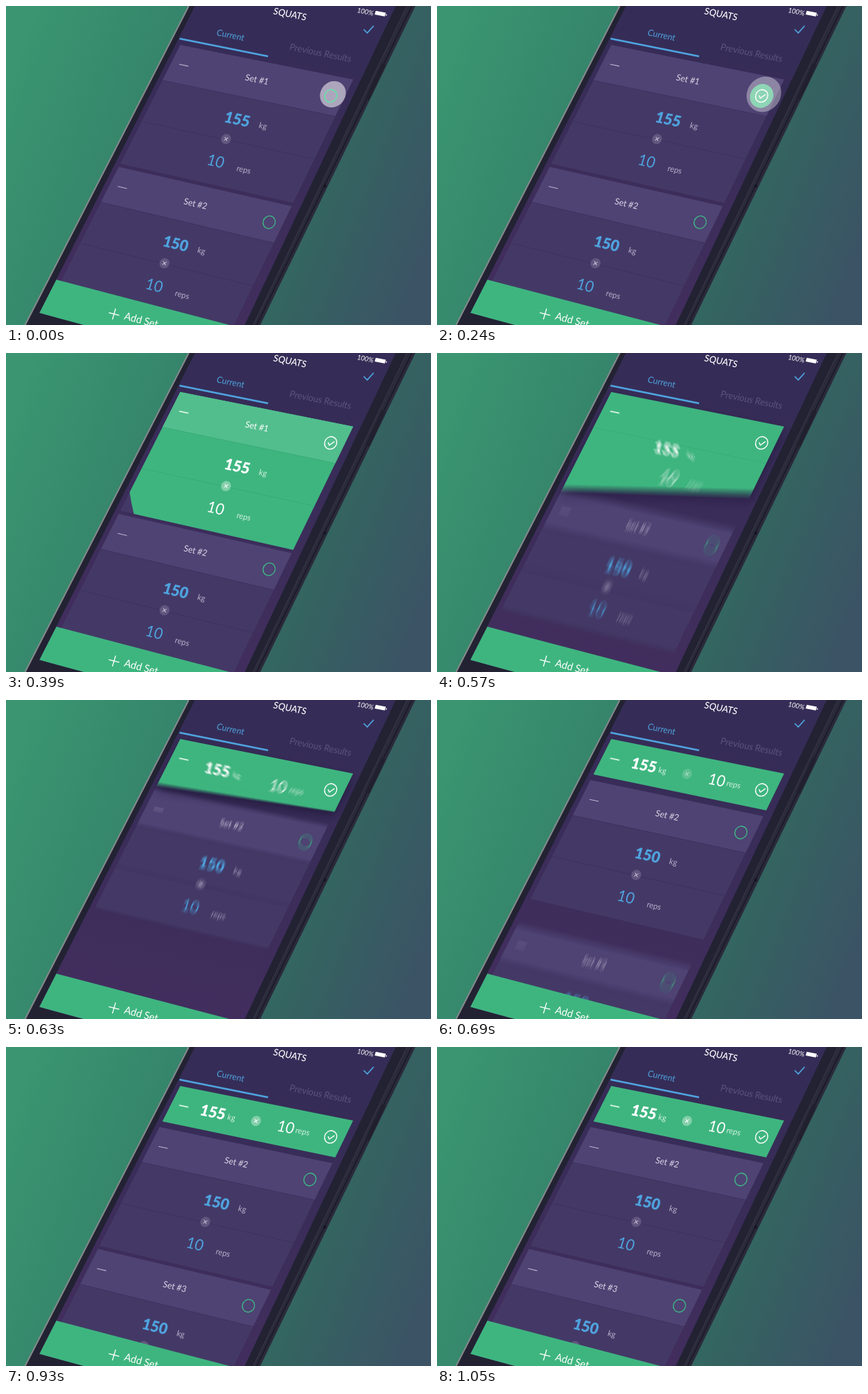
Write an HTML page with a canvas that moves like this. It is 600 px wide and 450 px high and loops after 1080 ms.

```html
<!DOCTYPE html>
<html lang="en">
<meta charset="utf-8">
<title>Workout sets</title>
<style>
html, body { margin: 0; overflow: hidden; }
canvas { display: block; }
</style>
<canvas id="stage" width="600" height="450"></canvas>
<script>
const LOOP = 1080, STEP = 30, CARD_W = 249, CARD_H = 188, HEAD_H = 56, PITCH = 193;
const BLUE = '#4fa3df', GREEN = '#3eb57f', WHITE = '#fff';
const PURPLE_LOOK = { body: '#443966', head: '#4e4373', kg: BLUE, reps: BLUE, text: '#dcd7e8',
  unit: '#b9b1cd', ring: '#3fb884', dot: '#62567f', cross: '#cbc4da', dash: 1.2, line: '#3d325f' };
const GREEN_LOOK = { body: GREEN, head: '#52be8d', kg: WHITE, reps: WHITE, text: WHITE,
  unit: '#d5f2e3', ring: WHITE, dot: '#83cfaa', cross: WHITE, dash: 1.8, line: '#38aa76' };

const stage = document.getElementById('stage').getContext('2d');
const layer = document.createElement('canvas');
layer.width = 600;
layer.height = 450;
const ctx = layer.getContext('2d');

const clamp = v => Math.max(0, Math.min(1, v));
const ramp = (t, a, b) => clamp((t - a) / (b - a));
const mix = (a, b, k) => a + (b - a) * k;
const ease = (t, a, b) => {
  const k = ramp(t, a, b);
  return k < .5 ? 4 * k ** 3 : 1 - 4 * (1 - k) ** 3;
};

// The list lies on a tilted plane: x runs across it, y down it.
const tilt = y => .2 + .000143 * y;
const point = (x, y) => [246 + .98 * x - .45 * y, 55 + .891 * y + .98 * x * tilt(y)];

function poly(c, points, fill) {
  c.beginPath();
  points.forEach(p => c.lineTo(...p));
  c.closePath();
  c.fillStyle = fill;
  c.fill();
}

function line(c, points, color, width) {
  c.beginPath();
  points.forEach(p => c.lineTo(...p));
  c.strokeStyle = color;
  c.lineWidth = width;
  c.stroke();
}

// Runs draw() with the origin at a stage position and tilted axes.
function at([px, py], slope, draw) {
  ctx.save();
  ctx.transform(.92, .92 * slope, -.28, .96, px, py);
  draw();
  ctx.restore();
}

const onPlane = (x, y, draw) => at(point(x, y), tilt(y), draw);

function label(str, size, weight, color) {
  ctx.font = `${weight} ${size}px Lato, "Open Sans", sans-serif`;
  ctx.textAlign = 'center';
  ctx.fillStyle = color;
  ctx.fillText(str, 0, size * (/^[a-z]/.test(str) ? .2 : .35));
}

function disc(r, color) {
  ctx.beginPath();
  ctx.arc(0, 0, r, 0, 7);
  ctx.fillStyle = color;
  ctx.fill();
}

function ring(color, ticked) {
  ctx.beginPath();
  ctx.arc(0, 0, 9, 0, 7);
  ctx.strokeStyle = color;
  ctx.lineWidth = 1.4;
  ctx.stroke();
  if (ticked) line(ctx, [[-4, 0], [-1, 3.5], [5, -3]], color, 1.4);
}

function card(y, name, kg, look, t = 0) {
  const left = mix(CARD_H, HEAD_H, ease(t, 485, 695));
  const right = mix(CARD_H, HEAD_H, ease(t, 453, 663));
  const move = ease(t, 482, 695), mx = move ** 1.25, my = move ** .75;
  const intro = 1 - ramp(t, 450, 540);
  const item = (x0, y0, x1, y1, draw) => onPlane(mix(x0, x1, mx), y + mix(y0, y1, my), draw);

  ctx.save();
  if (t > 450 && move < .98) {
    ctx.shadowColor = 'rgba(25,18,50,.6)';
    ctx.shadowBlur = 14;
    ctx.shadowOffsetY = 6;
  }
  poly(ctx, [point(0, y), point(CARD_W, y), point(CARD_W, y + right), point(0, y + left)], look.body);
  ctx.restore();

  ctx.globalAlpha = intro;
  poly(ctx, [point(0, y), point(CARD_W, y), point(CARD_W, y + HEAD_H), point(0, y + HEAD_H)], look.head);
  line(ctx, [point(0, y + 121), point(CARD_W, y + 121)], look.line, 1);
  onPlane(123, y + 27, () => label(name, 12.5, 400, look.text));
  ctx.globalAlpha = 1 - move;
  line(ctx, [point(0, y + HEAD_H), point(CARD_W, y + HEAD_H)], look.line, 1);
  ctx.globalAlpha = 1;

  onPlane(18, y + 28, () => line(ctx, [[-7, 0], [7, 0]], look.unit, look.dash));
  onPlane(230, y + 29, () => ring(look.ring, look === GREEN_LOOK));
  item(123, 89, 60, 28, () => label(kg, 22, 900, look.kg));
  item(161, 92, 88, 32, () => label('kg', 11.5, 400, look.unit));
  item(122, 154, 165, 28, () => label('10', 22, 400, look.reps));
  item(164, 159, 190, 31, () => label('reps', 11.5, 400, look.unit));
  ctx.globalAlpha = Math.max(1 - ramp(t, 480, 560), ramp(t, 660, 720));
  item(121, 120, 122, 28, () => {
    disc(7.3, look.dot);
    line(ctx, [[-2.5, -2.5], [2.5, 2.5]], look.cross, 1);
    line(ctx, [[2.5, -2.5], [-2.5, 2.5]], look.cross, 1);
  });
  ctx.globalAlpha = 1;
}

function firstCard(t) {
  const reveal = 298 * ramp(t, 180, 390) ** 2.28 + 60 * ramp(t, 390, 420);
  if (t < 420) card(0, 'Set #1', '155', PURPLE_LOOK);
  if (reveal > 0) {
    ctx.save();
    if (t < 420) {
      onPlane(230, 29, () => {
        ctx.beginPath();
        ctx.arc(0, 0, reveal, 0, 7);
      });
      ctx.clip();
    }
    card(0, 'Set #1', '155', GREEN_LOOK, t);
    ctx.restore();
  }
  const touch = t < 240 ? mix(.53, .35, ramp(t, 120, 240)) : .35 * (1 - ramp(t, 240, 360));
  if (touch > 0) {
    at([461.5, 124.5], .2, () => disc(mix(19, 25.5, ramp(t, 120, 240)), `rgba(255,255,255,${touch})`));
    if (reveal < 9) onPlane(230, 29, () => ring('#5fdca2', false));
  }
}

function chrome() {
  poly(ctx, [[230, 0], [600, 0], [600, 130], [490, 97], [229, 44]], '#352d57');
  at([401, 11.5], .2, () => label('SQUATS', 13.2, 500, WHITE));
  at([507.5, 8], .2, () => label('100%', 9.8, 400, WHITE));
  at([528.5, 11], .2, () => {
    ctx.fillStyle = WHITE;
    ctx.fillRect(-8, -3, 15.5, 5.5);
    ctx.fillRect(8.3, -1, 1.5, 2);
  });
  line(ctx, [[505, 33], [510, 38], [519, 28]], BLUE, 1.7);
  at([317, 41], .2, () => label('Current', 12.5, 400, BLUE));
  at([444, 66], .2, () => label('Previous Results', 13.2, 400, '#5d5383'));
  line(ctx, [[245, 46], [370, 71]], BLUE, 2.6);
}

function footer() {
  poly(ctx, [[71, 386], [350, 459], [350, 520], [47, 433]], GREEN);
  at([152.5, 434.5], .26, () => {
    line(ctx, [[-8, 0], [8, 0]], WHITE, 1.4);
    line(ctx, [[0, -8], [0, 8]], WHITE, 1.4);
  });
  at([191, 443], .26, () => label('Add Set', 14.8, 400, WHITE));
}

function screen(t) {
  ctx.clearRect(0, 0, 600, 450);
  ctx.save();
  const back = ctx.createLinearGradient(300, 60, 220, 440);
  back.addColorStop(0, '#362c57');
  back.addColorStop(1, '#422e5e');
  poly(ctx, [[267, 0], [550, 0], [337, 450], [110, 450], [47, 433]], back);
  ctx.clip();
  card(mix(2 * PITCH + 65, PITCH + 65, ease(t, 530, 780)), 'Set #3', '150', PURPLE_LOOK);
  card(mix(PITCH, 65, ease(t, 482, 695)), 'Set #2', '150', PURPLE_LOOK);
  firstCard(t);
  chrome();
  footer();
  ctx.restore();
}

function phone() {
  const wall = stage.createLinearGradient(0, 110, 600, 340);
  wall.addColorStop(0, '#3a9570');
  wall.addColorStop(.4, '#34806a');
  wall.addColorStop(.75, '#346460');
  wall.addColorStop(1, '#3b5365');
  stage.fillStyle = wall;
  stage.fillRect(0, 0, 600, 450);
  poly(stage, [[258, 0], [578, 0], [359, 450], [27, 450]], '#2a2a3b');
  poly(stage, [[258, 0], [566, 0], [349, 450], [27, 450]], '#222233');
  line(stage, [[566, 0], [349, 450]], '#38384a', 1);
  line(stage, [[573, 0], [354, 450]], '#1c1c2a', 2);
  line(stage, [[258, 0], [27, 450]], '#858a8b', 2);
  line(stage, [[533, 82], [510, 131]], '#20202e', 6);
  stage.beginPath();
  stage.arc(450, 254, 2, 0, 7);
  stage.fillStyle = '#14141f';
  stage.fill();
}

function render(t) {
  phone();
  // Averages several moments across the shutter while cards are sliding.
  const blurred = t > 480 && t < 780, samples = blurred ? 8 : 1;
  for (let i = 0; i < samples; i++) {
    screen(blurred ? t + mix(-5, 5, i / (samples - 1)) : t);
    stage.globalAlpha = 1 / (i + 1);
    stage.drawImage(layer, 0, 0);
  }
  stage.globalAlpha = 1;
}

const start = performance.now();
let shown = -1;
function tick() {
  const t = Math.floor((performance.now() - start) % LOOP / STEP) * STEP;
  if (t !== shown) render(shown = t);
  requestAnimationFrame(tick);
}
tick();
</script>
</html>
```
